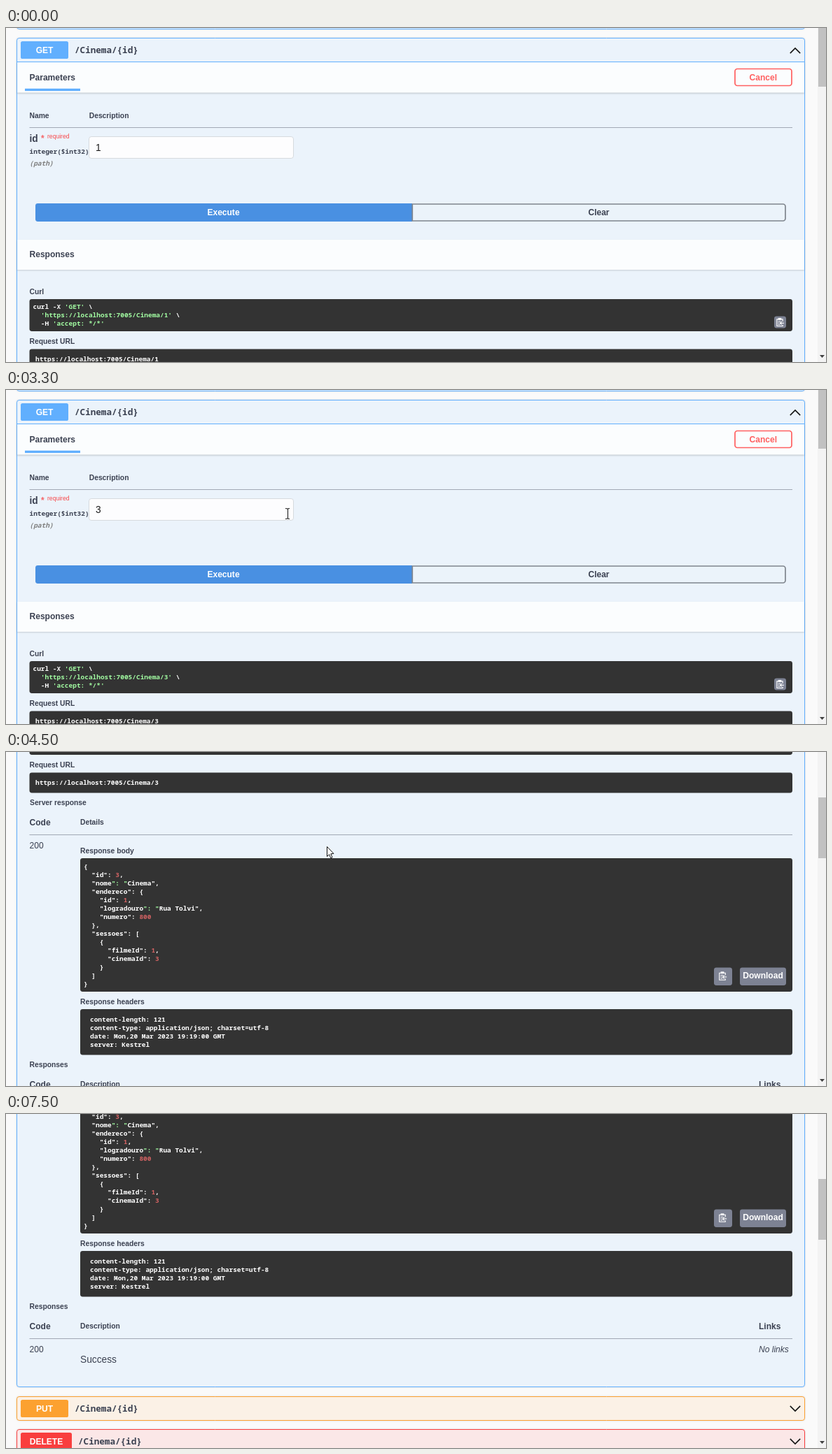
Recreate the animation shown at these times as an HTML page with a canvas. Size 1171x478 px, loop 8 s.

```html
<!DOCTYPE html>
<html lang="en">
<head>
<meta charset="utf-8">
<title>API explorer</title>
<style>
html, body { margin: 0; width: 100%; height: 100%; overflow: hidden; background: #fafafa; }
canvas { display: block; }
</style>
</head>
<body>
<canvas id="stage" width="1171" height="478"></canvas>
<script>
const W = 1171, H = 478, LOOP = 8000, STEP = 100;
const ctx = document.getElementById('stage').getContext('2d');

const SANS = '"Liberation Sans", Arial, sans-serif';
const MONO = '"Noto Sans Mono", "DejaVu Sans Mono", monospace';
const BOLD = `bold 12.04px ${SANS}`;
const SMALL = `bold 10.32px ${SANS}`;
const PLAIN = `12.04px ${SANS}`;
const LARGE = `13.76px ${SANS}`;
const CODE = `bold 9.46px ${MONO}`;
const PATH = `bold 12.62px ${MONO}`;
const INK = '#3b4151', BLUE = '#61affe', DARK = '#333', GREY = '#7d8293';
const GREEN = '#a2fca2', RED = '#d36363';

const JSON_LINES = [
  '{', '  "id": 3,', '  "nome": "Cinema",', '  "endereco": {', '    "id": 1,',
  '    "logradouro": "Rua Tolvi",', '    "numero": 800', '  },', '  "sessoes": [',
  '    {', '      "filmeId": 1,', '      "cinemaId": 3', '    }', '  ]', '}'
];
const HEADER_LINES = [
  'content-length: 121', 'content-type: application/json; charset=utf-8',
  'date: Mon,20 Mar 2023 19:19:00 GMT', 'server: Kestrel'
];

// Pointer legs: each is a list of [time, x, y]
const LEGS = [
  [[200, 39, 245], [300, 120, 205], [400, 220, 178], [500, 262, 172],
   [2300, 262, 172], [2400, 266, 182], [2500, 275, 215], [2600, 285, 248], [2700, 289, 261],
   [3100, 289, 261], [3400, 458, 135], [6900, 458, 135], [7400, 53, 450]]
];
const SCROLLS = [[3400, 86], [3500, 172], [3900, 258], [4000, 344], [4500, 430], [5900, 516], [6600, 602]];

function text(str, x, y, font, color = INK, align = 'left') {
  ctx.font = font;
  ctx.fillStyle = color;
  ctx.textAlign = align;
  ctx.fillText(str, x, y);
}

function box(x1, y1, x2, y2, fill, r = 3.4) {
  ctx.beginPath();
  ctx.roundRect(x1, y1, x2 - x1, y2 - y1, r);
  if (fill) {
    ctx.fillStyle = fill;
    ctx.fill();
  }
}

function outline(color, width = 1) {
  ctx.strokeStyle = color;
  ctx.lineWidth = width;
  ctx.stroke();
}

function shadowed(color, blur, dy, draw) {
  ctx.save();
  ctx.shadowColor = color;
  ctx.shadowBlur = blur;
  ctx.shadowOffsetY = dy;
  draw();
  ctx.restore();
}

function poly(points, fill, stroke, width = 1) {
  ctx.beginPath();
  points.forEach(([x, y], i) => i ? ctx.lineTo(x, y) : ctx.moveTo(x, y));
  if (fill) {
    ctx.closePath();
    ctx.fillStyle = fill;
    ctx.fill();
  }
  if (stroke) outline(stroke, width);
}

function rule(y) {
  ctx.fillStyle = 'rgba(59,65,81,.42)';
  ctx.fillRect(33.5, y, 1089.5, 1);
}

function codeLines(lines, x, y, colored) {
  lines.forEach((line, i) => {
    let dx = 0;
    const parts = colored ? line.split(/("[^"]*"(?!:)|'[^']*'|\b\d+\b)/) : [line];
    parts.forEach((part, k) => {
      const color = k % 2 === 0 ? '#fff' : /\d/.test(part[0]) ? RED : GREEN;
      text(part, x + dx, y + i * 12.03, CODE, color);
      dx += ctx.measureText(part).width;
    });
  });
}

function card(top, bottom, color, tint) {
  shadowed('rgba(0,0,0,.19)', 3, 0, () => box(15.5, top, 1140.5, bottom, '#fafafa'));
  box(15.5, top, 1140.5, bottom, tint);
  outline(color, 1);
}

function chevron(y, dir) {
  poly([[1119.8, y - 3.6 * dir], [1127, y + 3.6 * dir], [1134.2, y - 3.6 * dir]], null, '#111', 1.5);
}

function summary(top, method, color, width) {
  box(21, top + 4.5, 21 + width, top + 29.5, color, 2.6);
  text(method, 21 + width / 2, top + 21.5, BOLD, '#fff', 'center');
  text('/Cinema/{id}', 30 + width, top + 21.5, PATH);
}

function band(top, bottom) {
  shadowed('rgba(0,0,0,.16)', 2, 1, () => {
    ctx.fillStyle = '#fbfdfe';
    ctx.fillRect(16, top, 1124, bottom - top);
  });
}

function clipboard(cx, cy, s) {
  ctx.save();
  ctx.translate(cx, cy);
  ctx.scale(s, s);
  poly([[4.5, -1], [4.5, -4.5], [-4.5, -4.5], [-4.5, 6], [4.5, 6], [4.5, 4]], null, '#fff', 1.2);
  ctx.fillStyle = '#fff';
  ctx.fillRect(-2.5, -6.5, 5, 3);
  ctx.fillRect(-2.7, -1.6, 4, 1);
  ctx.fillRect(-2.7, 0.8, 2, 1);
  ctx.fillRect(-2.7, 3.2, 3, 1);
  poly([[6.5, 1.5], [0.5, 1.5]], null, '#fff', 1.2);
  poly([[3, -1], [0.5, 1.5], [3, 4]], null, '#fff', 1.2);
  ctx.restore();
}

function field(t) {
  const focused = t >= 500 && t < 2700;
  const value = t < 1700 ? '1' : t < 1800 ? '' : '3';
  box(118.5, 155.5, 410.5, 186.5, '#fdfdfe');
  outline('#d6dade');
  if (focused) {
    box(118, 155, 411, 187, null, 3.6);
    outline('#101010', 1.7);
  }
  text(value, 128, 175.5, LARGE, '#1a1a1a');
  const caretOn = (t >= 500 && t < 1000) || (t >= 1500 && t < 2300);
  if (focused && caretOn) {
    ctx.fillStyle = '#000';
    ctx.fillRect(value === '1' ? 135 : value ? 136 : 128, 163, 1, 15);
  }
}

function request(t, hover) {
  summary(14.5, 'GET', BLUE, 68);
  chevron(32.5, -1);
  band(49, 92.5);
  ctx.fillStyle = BLUE;
  ctx.fillRect(16, 48, 1124, 1);
  text('Parameters', 33.5, 75, BOLD);
  ctx.fillStyle = BLUE;
  ctx.fillRect(27, 86.7, 79, 3.4);
  box(1041, 58.5, 1122, 82.5, null);
  outline('#ff6060', 1.7);
  text('Cancel', 1081.3, 75, BOLD, '#ff6060', 'center');

  text('Name', 33.5, 129, SMALL);
  text('Description', 118.7, 129, SMALL);
  rule(142);
  text('id', 33.5, 163, `bold 13.76px ${SANS}`);
  text('*', 50, 162, `bold 12px ${SANS}`, '#f56567');
  text('required', 59, 158, `8.6px ${SANS}`, '#f8484a');
  text('integer($int32)', 33.5, 180, CODE);
  text('(path)', 33.5, 197, `italic ${CODE}`, '#808080');
  field(t);

  const execute = () => box(42, 251, 580, 277, '#4990e2', [3.4, 0, 0, 3.4]);
  if (hover) shadowed('rgba(0,0,0,.3)', 5, 0, execute);
  else execute();
  text('Execute', 310.5, 268, BOLD, '#fff', 'center');
  box(580.3, 252, 1113, 276, '#ebf3fa', [0, 3.4, 3.4, 0]);
  outline('#7f858d', 1.7);
  text('Clear', 846.5, 268, BOLD, INK, 'center');
}

function response(id) {
  band(303, 346);
  text('Responses', 33.5, 328, BOLD);

  text('Curl', 33.5, 381, SMALL);
  box(33.5, 388, 1123, 434, DARK);
  codeLines(["curl -X 'GET' \\", `  'https://localhost:7005/Cinema/${id}' \\`, "  -H 'accept: */*'"], 38.5, 402, true);
  box(1097, 412.5, 1114, 429.5, GREY);
  clipboard(1105, 421, 0.92);

  text('Request URL', 33.5, 452, SMALL);
  box(33.5, 459.5, 1123, 488.5, DARK);
  codeLines([`https://localhost:7005/Cinema/${id}`], 42, 477, false);

  text('Server response', 34, 506, SMALL);
  text('Code', 33.5, 534.5, BOLD);
  text('Details', 106, 534, SMALL);
  rule(548);
  text('200', 33.5, 568, PLAIN);
  text('Response body', 106, 575, SMALL);
  box(106, 582, 1123, 773, DARK);
  codeLines(JSON_LINES, 111, 597, true);
  box(1011, 738.5, 1037, 764, GREY);
  clipboard(1023, 750.5, 0.95);
  box(1048, 738.5, 1114, 764, GREY);
  text('Download', 1081, 754, BOLD, '#fff', 'center');

  text('Response headers', 106, 791, SMALL);
  box(106, 798, 1123, 863.5, DARK);
  codeLines(HEADER_LINES, 120, 816, false);

  text('Responses', 33.5, 881, SMALL);
  text('Code', 33.5, 909.5, BOLD);
  text('Description', 106, 909, SMALL);
  text('Links', 1075, 909.5, BOLD);
  rule(923);
  text('200', 33.5, 943, PLAIN);
  text('Success', 106, 958, LARGE);
  text('No links', 1075, 943, `italic ${PLAIN}`);
}

function scrollbar(scroll) {
  ctx.fillStyle = '#f3f3f3';
  ctx.fillRect(1159, 0, 12, H);
  ctx.fillStyle = '#c1c1c1';
  ctx.fillRect(1160, Math.round(scroll * 0.16 - 3.5), 11, 87);
  ctx.fillStyle = '#f3f3f3';
  ctx.fillRect(1159, 461, 12, 17);
  poly([[1162, 468], [1169, 468], [1165.5, 472]], '#404040');
}

function pointerAt(t) {
  for (const leg of LEGS) {
    for (let i = 0; i < leg.length; i++) {
      const [t1, x1, y1] = leg[i];
      if (t === t1) return { x: x1, y: y1 };
      if (i + 1 === leg.length || t < t1 || t > leg[i + 1][0]) continue;
      const [t2, x2, y2] = leg[i + 1];
      const k = (t - t1) / (t2 - t1);
      return { x: Math.round(x1 + (x2 - x1) * k), y: Math.round(y1 + (y2 - y1) * k) };
    }
  }
  return null;
}

const inside = (p, x1, y1, x2, y2) => p && p.x >= x1 && p.x <= x2 && p.y >= y1 && p.y <= y2;

const shapes = {
  arrow() {
    poly([[0.5, 0.5], [0.5, 14.5], [3.6, 11.6], [5.8, 16.8], [8, 15.8], [5.8, 10.8], [9.9, 10.4]], '#fff', '#111');
  },
  beam() {
    poly([[-3, -7.5], [0, -7], [3, -7.5]], null, '#111');
    poly([[-3, 7.5], [0, 7], [3, 7.5]], null, '#111');
    poly([[0.5, -7], [0.5, 7]], null, '#111');
  },
  hand() {
    poly([[-1, 0.5], [1, 0.5], [1.5, 5.5], [7, 7], [8.5, 9], [7.5, 14], [6, 17.5],
      [-1, 17.5], [-6, 11], [-4.5, 9.5], [-1.5, 11.5]], '#fff', '#111');
  },
  blocked() {
    ctx.beginPath();
    ctx.arc(0, 0, 6, 0, Math.PI * 2);
    ctx.fillStyle = '#fff';
    ctx.fill();
    outline('#c00014', 2.2);
    poly([[-4.2, -4.2], [4.2, 4.2]], null, '#c00014', 2.2);
  }
};

function draw(t) {
  const scroll = SCROLLS.reduce((s, [at, y]) => t >= at ? y : s, 0);
  const pointer = pointerAt(t);
  const page = pointer && { x: pointer.x, y: pointer.y + scroll };
  const hover = inside(page, 42, 251, 580, 277);

  ctx.fillStyle = '#fafafa';
  ctx.fillRect(0, 0, W, H);
  ctx.save();
  ctx.translate(0, -scroll);
  card(-30, 1.5, BLUE, 'rgba(97,175,254,.1)');
  card(14.5, 992.5, BLUE, 'rgba(97,175,254,.1)');
  request(t, hover);
  response(t < 3100 ? 1 : 3);
  card(1006.5, 1040.5, '#fca130', 'rgba(252,161,48,.1)');
  summary(1006.5, 'PUT', '#fca130', 68);
  chevron(1023.5, 1);
  card(1053.5, 1087.5, '#f93e3e', 'rgba(249,62,62,.1)');
  summary(1053.5, 'DELETE', '#f93e3e', 73);
  chevron(1070.5, 1);
  ctx.restore();
  scrollbar(scroll);

  if (!pointer) return;
  let kind = 'arrow';
  if (hover) kind = t >= 2900 && t < 3100 ? 'blocked' : 'hand';
  else if (inside(page, 119, 156, 410, 186)) kind = 'beam';
  else if (inside(page, 16, 1006, 1140, 1040)) kind = 'hand';
  ctx.save();
  ctx.translate(pointer.x, pointer.y);
  shapes[kind]();
  ctx.restore();
}

function tick() {
  const t = performance.now() % LOOP;
  draw(Math.floor(t / STEP) * STEP);
  requestAnimationFrame(tick);
}
tick();
</script>
</body>
</html>
```
